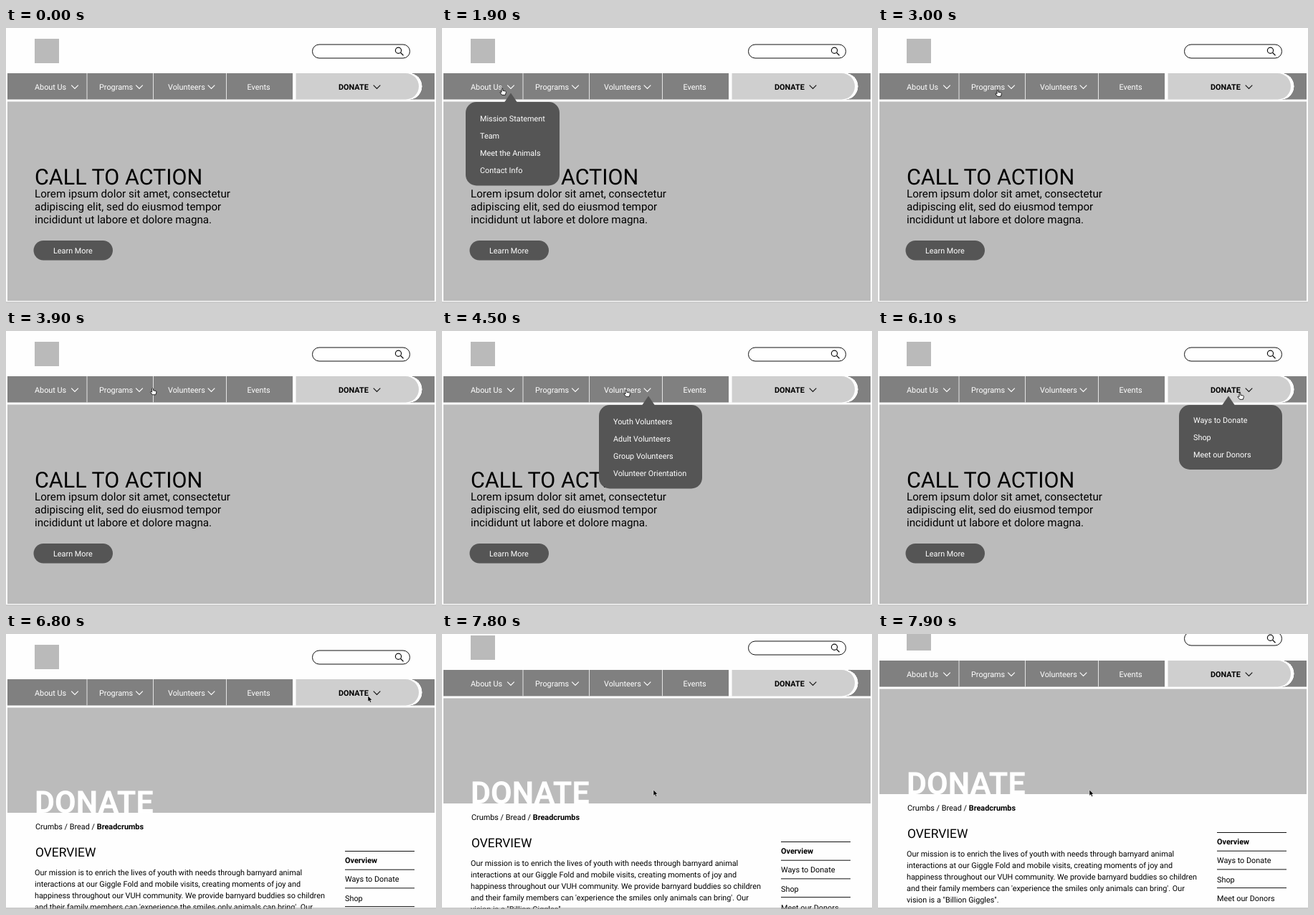
These frames come from a looping animation (600 px wide and 383 px high, 8 s). An HTML page:

```html
<!DOCTYPE html>
<html lang="en">
<head>
<meta charset="utf-8">
<title>Website wireframe walkthrough</title>
<style>
html, body { margin: 0; width: 100%; height: 100%; overflow: hidden; background: #fefefe; }
svg { display: block; width: 100%; height: 100%; }
text { font: 10.85px Roboto, sans-serif; text-rendering: geometricPrecision; white-space: pre; }
.b { font-weight: 700; }
.w { fill: #fff; }
.line { fill: none; stroke: #111; }
</style>
</head>
<body>
<svg viewBox="0 0 600 383">
  <g id="page">
    <path d="M40 15h34v34h-34z" fill="#bababa"/>
    <g class="line">
      <rect x="427.5" y="23" width="136" height="19" rx="9.5" fill="#fff"/>
      <circle cx="547.5" cy="31.2" r="4.1" stroke-width="1.2"/>
      <path d="M550.5 34.3l4 4" stroke-width="1.3"/>
    </g>
    <path d="M2 63h596v36.5H2z" fill="#808080"/>
    <path d="M113 63v36.5M205.5 63v36.5M307.5 63v36.5" stroke="#e4e4e4"/>
    <path d="M400 63h161.500a18.250 18.250 0 0 1 0 36.500H400z" fill="#fefefe" transform="translate(.3)"/>
    <path d="M400 63h162a18.250 18.250 0 0 1 0 36.500h-162z" fill="#fefefe"/>
    <path d="M566 63a18.250 18.250 0 0 1 0 36.500h-10v-36.500z" fill="#fefefe" transform="translate(-4)"/>
    <path d="M558 63h4a18.250 18.250 0 0 1 0 36.500h-4z" fill="#fefefe"/>
    <g id="nav"></g>
    <g id="home">
      <path d="M2 102.500h596v277.500H2z" fill="#bbb"/>
      <text x="40" y="218" style="font-size:30.500px">CALL TO ACTION</text>
      <g id="intro"></g>
      <rect x="38.500" y="296" width="110.500" height="27.500" rx="13.750" fill="#555"/>
      <text class="w" x="66" y="313.500">Learn More</text>
    </g>
    <g id="donate">
      <path d="M2 102.500h596v146.500H2z" fill="#bbb"/>
      <text class="w b" x="40" y="249" style="font-size:43px">DONATE</text>
      <text x="41" y="271.500">Crumbs / Bread / <tspan class="b">Breadcrumbs</tspan></text>
      <text x="41" y="310" style="font-size:17.400px">OVERVIEW</text>
      <g id="about"></g>
      <g id="side"></g>
    </g>
  </g>
  <path d="M0 382h600" stroke="#999"/>
  <g id="menu"></g>
  <g id="cursor">
    <path id="arrow" d="M0 0v8.300l1.900-1.700 1.300 2.900 1.500-.7-1.300-2.700h2.500z" stroke="#fff" stroke-width=".5"/>
    <path id="hand" d="M-.9.700Q0-.5.9.700V3.300L4.500 4Q5.600 4.300 5.400 5.600L4.400 9.300H-.3L-3 5.900Q-3 4.600-1.700 5.100L-.9 5.700z" fill="#fff" stroke="#111" stroke-width=".9"/>
  </g>
</svg>
<script>
const $ = id => document.getElementById(id);
const text = (s, x, y, cls = '', size = 10.85) =>
  `<text class="${cls}" x="${x}" y="${y}" style="font-size:${size}px">${s}</text>`;
const chevron = (x, color) =>
  `<path d="M${x - 4.8} 79.700l4.800 4.800 4.800-4.800" fill="none" stroke="${color}" stroke-width="1.100"/>`;

// Donate tab: white rim, then the tab itself
const tab = (x, end, fill) =>
  `<path d="M${x} 63H${end - 18.25}a18.250 18.250 0 0 1 0 36.500H${x}z" fill="${fill}"/>`;
$('nav').innerHTML = tab(400, 580, '#fefefe') + tab(404.5, 576, '#cfcfcf') +
  [['About Us', 40], ['Programs', 130], ['Volunteers', 226], ['Events', 336.5]]
    .map(([s, x]) => text(s, x, 86, 'w')).join('') +
  [96, 186, 286.5].map(x => chevron(x, '#fff')).join('') +
  text('DONATE', 464, 86, 'b') + chevron(517.5, '#111');

$('intro').innerHTML = [
  'Lorem ipsum dolor sit amet, consectetur',
  'adipiscing elit, sed do eiusmod tempor',
  'incididunt ut labore et dolore magna.'
].map((s, i) => text(s, 40, 235.5 + 18 * i, '', 15.2)).join('');

$('about').innerHTML = [
  'Our mission is to enrich the lives of youth with needs through barnyard animal',
  'interactions at our Giggle Fold and mobile visits, creating moments of joy and',
  'happiness throughout our VUH community. We provide barnyard buddies so children',
  "and their family members can 'experience the smiles only animals can bring'. Our",
  'vision is a "Billion Giggles".'
].map((s, i) => text(s, 40, 335.7 + 16 * i)).join('');

$('side').innerHTML = ['Overview', 'Ways to Donate', 'Shop', 'Meet our Donors'].map((s, i) =>
  `<path class="line" d="M473 ${302.5 + 25.7 * i}h97"/>` +
  text(s, 473, 319.3 + 26.1 * i, i ? '' : 'b')).join('');

// open, close, left, width, pointer x, items
const menus = [
  [1800, 2700, 33, 131, 96, ['Mission Statement', 'Team', 'Meet the Animals', 'Contact Info']],
  [3100, 3900, 119, 140, 186, ['Animal Experiences', 'Mobile Visits', 'Field Trips', 'Summer Camp']],
  [4500, 5500, 219, 144, 288, ['Youth Volunteers', 'Adult Volunteers', 'Group Volunteers', 'Volunteer Orientation']],
  [6100, 6800, 420, 144, 489, ['Ways to Donate', 'Shop', 'Meet our Donors']]
];
$('menu').innerHTML = menus.map(([, , x, w, tip, items]) => {
  const top = items.length > 3 ? 129.5 : 128;
  return `<g><path d="M${tip} 90.500l9 13h-18z" fill="#555"/>
    <rect x="${x}" y="103" width="${w}" height="${items.length > 3 ? 116.5 : 90}" rx="15" fill="#555"/>` +
    items.map((s, i) => text(s, x + 20, top + 24 * i, 'w')).join('') + '</g>';
}).join('');

// start, end, from, to, upward bow
const moves = [
  [200, 400, [356, 354], [97, 186], 0],
  [500, 1400, [97, 186], [68, 81], 0],
  [1700, 1900, [68, 81], [84, 84], 0],
  [2400, 3000, [84, 84], [167, 86], 6],
  [3500, 4400, [167, 86], [257, 82], 5],
  [5200, 6000, [257, 82], [505, 86], 0],
  [7000, 7500, [505, 86], [295, 217], 0]
];
const ease = (t, a, b) => {
  const p = Math.min(1, Math.max(0, (t - a) / (b - a)));
  return p * p * (3 - 2 * p);
};
const show = (el, on) => el.style.display = on ? '' : 'none';

function draw(now) {
  const t = Math.floor(now % 8000 / 100) * 100; // ten pictures a second
  const home = t < 6800;
  show($('home'), home);
  show($('donate'), !home);
  $('page').setAttribute('transform', `translate(0 ${-26 * ease(t, 7700, 7900)})`);
  menus.forEach(([open, close], i) => show($('menu').children[i], t >= open && t < close));

  const [a, b, from, to, bow] = moves.filter(m => t >= m[0]).pop() || moves[0];
  const p = ease(t, a, b);
  const x = from[0] + (to[0] - from[0]) * p;
  const y = from[1] + (to[1] - from[1]) * p - bow * 4 * p * (1 - p);
  const hand = home && y < 100;
  show($('cursor'), t >= 200);
  show($('hand'), hand);
  show($('arrow'), !hand);
  $('cursor').setAttribute('transform', `translate(${x} ${y})`);
  requestAnimationFrame(draw);
}
requestAnimationFrame(draw);
</script>
</body>
</html>
```
